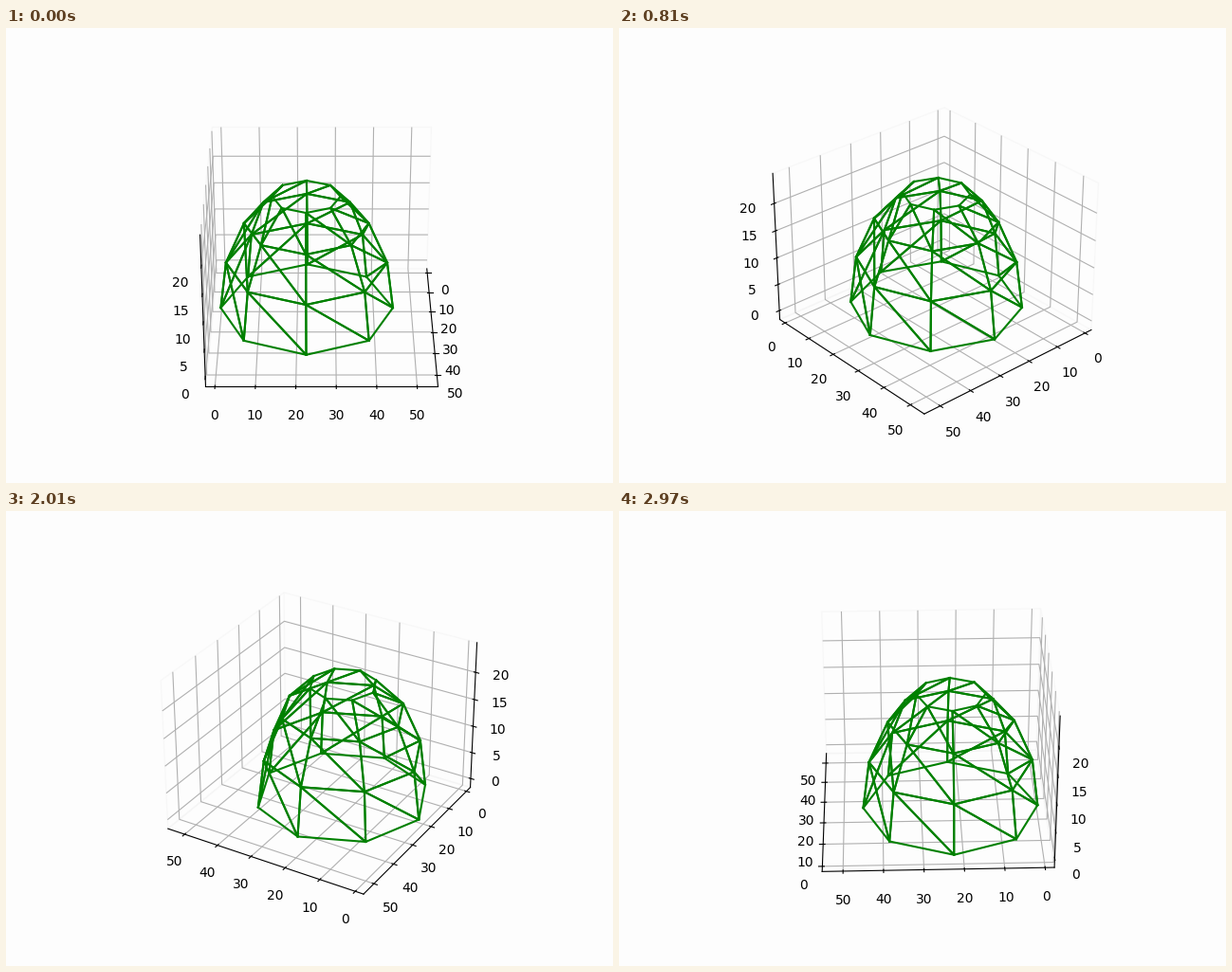
A matplotlib script for the animation above (3000 ms loop, 640 by 480 pixels).

```python
import matplotlib.pyplot as plt
import numpy as np
from matplotlib.animation import FuncAnimation

FRAMES = 100
SIDES, RINGS = 8, 4
RADIUS = 22.5

fig = plt.figure(figsize=(6.4, 4.8), dpi=100, facecolor="#fdfdfd")
ax = fig.add_subplot(projection="3d", facecolor="none")


def vertex(ring, k):
    """Point k of a ring on the hemisphere, ring 0 being the base."""
    tilt = ring * np.pi / 2 / RINGS
    turn = 2 * np.pi * k / SIDES
    return (RADIUS * (1 + np.cos(tilt) * np.cos(turn)),
            RADIUS * (1 + np.cos(tilt) * np.sin(turn)),
            RADIUS * np.sin(tilt))


def triangle(*corners):
    ax.plot(*zip(*corners, corners[0]), color="green", lw=1.5)


for ring in range(RINGS - 1):
    for k in range(SIDES):
        low, low_next = vertex(ring, k), vertex(ring, k + 1)
        high, high_next = vertex(ring + 1, k), vertex(ring + 1, k + 1)
        triangle(low, low_next, high)
        triangle(high, low_next, high_next)

ax.set(xlim=(-2.3, 55.15), ylim=(-2.3, 55.15), zlim=(-1.72, 25.38))
ax.set_zticks(range(0, 25, 5))

for axis in (ax.xaxis, ax.yaxis, ax.zaxis):
    axis.pane.set_facecolor("none")
    axis.pane.set_edgecolor("#f3f3f3")


def update(frame):
    ax.view_init(elev=30, azim=180 * frame / FRAMES)


anim = FuncAnimation(fig, update, frames=FRAMES, interval=30, repeat=True)
plt.show()
```
